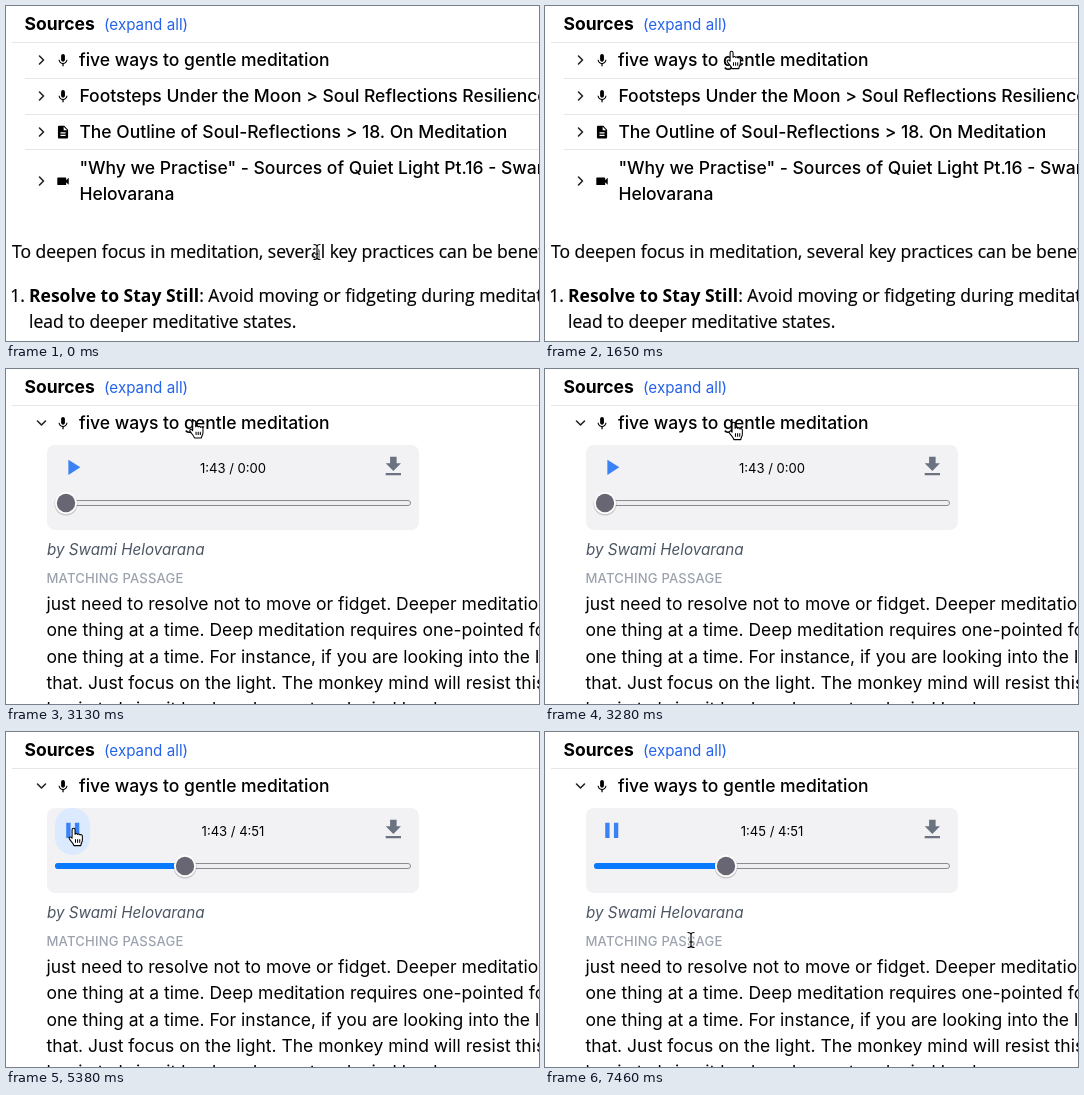
Animation, 533 px wide and 335 px high, one loop 8000 ms. Source, as an HTML page:

```html
<!DOCTYPE html>
<html lang="en">
<head>
<meta charset="utf-8">
<title>Sources</title>
<style>
  html, body { margin: 0; width: 100%; height: 100%; overflow: hidden; background: #fff; }
  svg { display: block; width: 533px; height: 335px; }
  text { font-family: Inter, sans-serif; font-size: 17.5px; white-space: pre; }
  .title { font-weight: 500; }
  .small { font-size: 15.2px; }
  .tiny { font-size: 13.05px; }
  .prose text { font-family: "Open Sans", sans-serif; stroke: #000; stroke-width: .2; }
  .prose .strong { font-weight: 700; stroke: none; }
  .rule { stroke: #e5e7eb; }
  .chevron { fill: none; stroke: #222; stroke-width: 1.6; stroke-linecap: round; stroke-linejoin: round; }
  .cursor { fill: #fff; stroke: #000; stroke-linejoin: round; }
</style>
</head>
<body>
<svg viewBox="0 0 533 335">
  <defs>
    <path id="chevron" class="chevron" d="M-2-4 2 0-2 4"/>
    <path id="mic" d="M12 14c1.66 0 3-1.34 3-3V5c0-1.66-1.34-3-3-3S9 3.34 9 5v6c0 1.66 1.34 3 3 3zm5.3-3c0 3-2.54 5.1-5.3 5.1S6.7 14 6.7 11H5c0 3.41 2.72 6.23 6 6.72V21h2v-3.28c3.28-.48 6-3.3 6-6.72z"/>
  </defs>

  <text x="18.5" y="24.2" font-weight="700">Sources</text>
  <text x="98" y="24" class="small" fill="#2563eb">(expand all)</text>
  <path class="rule" d="M6 36.5H533"/>

  <use id="toggle" href="#chevron"/>
  <use href="#mic" transform="translate(49.4 46.8) scale(.635)"/>
  <text class="title" x="73" y="60.2">five ways to gentle meditation</text>

  <g id="collapsed">
    <path class="rule" d="M19 72.5H533M19 108.5H533M19 143.5H533"/>
    <use href="#chevron" x="35.5" y="90"/>
    <use href="#chevron" x="35.5" y="126"/>
    <use href="#chevron" x="35.5" y="175"/>
    <use href="#mic" transform="translate(49.4 82.8) scale(.635)"/>
    <path transform="translate(49.4 118.6) scale(.635)" d="M14 2H6c-1.1 0-2 .9-2 2v16c0 1.1.9 2 2 2h12c1.1 0 2-.9 2-2V8zm2 16H8v-2h8zm0-4H8v-2h8zm-3-5V3.5L18.5 9z"/>
    <path transform="translate(49.4 167.6) scale(.635)" d="M17 10.5V7c0-.55-.45-1-1-1H4c-.55 0-1 .45-1 1v10c0 .55.45 1 1 1h12c.55 0 1-.45 1-1v-3.5l4 4v-11z"/>
    <g class="title">
      <text x="73.4" y="96.2">Footsteps Under the Moon &gt; Soul Reflections Resilience Talks</text>
      <text x="73.4" y="132.2">The Outline of Soul-Reflections &gt; 18. On Meditation</text>
      <text x="73.4" y="168.2">"Why we Practise" - Sources of Quiet Light Pt.16 - Swami</text>
      <text x="73.4" y="194.2">Helovarana</text>
    </g>
    <g class="prose">
      <text x="6" y="251.5">To deepen focus in meditation, several key practices can be beneficial:</text>
      <text x="4.2" y="295.5">1.</text>
      <text x="23" y="295.5"><tspan class="strong">Resolve to Stay Still</tspan>: Avoid moving or fidgeting during meditation, as it</text>
      <text x="23" y="321.6">lead to deeper meditative states.</text>
    </g>
  </g>

  <g id="expanded">
    <rect id="panel" x="41" y="76" width="372" rx="8" fill="#f2f2f5"/>
    <g id="loading">
      <path id="spinner" d="M-6.4 6.4A9 9 0 0 0 6.4 6.4" fill="none" stroke="#3b82f6" stroke-width="1.9"/>
      <text class="small" x="75.5" y="92.4" fill="#3b82f6">Loading audio...</text>
    </g>
    <g id="content">
      <rect id="hover" x="49" y="76" width="35" height="47" rx="17.5" fill="#dbeafe"/>
      <path id="button" fill="#3b82f6" transform="translate(53.7 85.3) scale(1.0875)"/>
      <text id="clock" class="tiny" x="227" y="103.8" text-anchor="middle"></text>
      <path id="download" fill="#6b7280" transform="translate(374.3 84.5) scale(1.0875)" d="M19 9h-4V3H9v6H5l7 7zM5 18v2h14v-2z"/>
      <rect id="track" x="49.5" y="131.5" width="355" height="5" rx="2.5" fill="#efeff1" stroke="#8b8b91"/>
      <rect id="played" x="49" y="131" height="6" rx="3" fill="#077aff"/>
      <g id="thumb">
        <circle cy="1" r="11.6" fill="#000" opacity=".16"/>
        <circle r="11" fill="#fff"/>
        <circle id="knob" r="9.2"/>
      </g>
      <text class="small" x="41" y="186.4" font-style="italic" fill="#4b5563">by Swami Helovarana</text>
      <text class="tiny title" x="40.5" y="214.2" fill="#9ca3af" letter-spacing=".2">MATCHING PASSAGE</text>
      <g id="passage"></g>
    </g>
  </g>

  <g id="cursor">
    <path id="hand" class="cursor" transform="translate(.8 .6) scale(1.06)" d="M-3.5 1.5V-6.5a1.4 1.4 0 0 1 2.8 0V-2.2c.3-1 2.2-.9 2.4.2.4-.8 2-.7 2.3.5.5-.7 2.2-.4 2.2.9V3.2C6.2 5.4 5 6 4.7 8.5H-1.8C-2.2 6.4-4.5 4.6-6 2.2-7 .6-5.2-.5-3.5 1.5ZM-.3 2.5v3.2M1.7 2.5v3.2M3.7 2.5v3.2"/>
    <path id="arrow" class="cursor" style="fill:#000;stroke:#fff" d="M-4-8V6L-1 3.2 1.1 8 3.5 7 1.4 2.3H5.5Z"/>
    <g id="beam" fill="none">
      <path id="beamEdge" stroke="#fff" stroke-width="3"/>
      <path id="beamLine" stroke="#000" stroke-width="1.2"/>
    </g>
  </g>
</svg>

<script>
const LOOP = 8000, TICK = 149.1;
const el = id => document.getElementById(id);
const set = (id, attrs) => Object.entries(attrs).forEach(([name, value]) => el(id).setAttribute(name, value));
const show = (id, visible) => set(id, { display: visible ? 'inline' : 'none' });

const icons = {
  hourglass: 'M6 2v6l4 4-4 4v6h12v-6l-4-4 4-4V2zm10 14.5V20H8v-3.5l4-4zm-4-5l-4-4V4h8v3.5z',
  play: 'M8 5v14l11-7z',
  pause: 'M6 19h4V5H6zm8-14v14h4V5z',
};
const beam = 'M-3.5-7.5Q0-7.5 0-5.5Q0-7.5 3.5-7.5M0-5.5V5.5M-3.5 7.5Q0 7.5 0 5.5Q0 7.5 3.5 7.5M-2 2H2';
set('beamEdge', { d: beam });
set('beamLine', { d: beam });

[
  'just need to resolve not to move or fidget. Deeper meditation',
  'one thing at a time. Deep meditation requires one-pointed focus',
  'one thing at a time. For instance, if you are looking into the light',
  'that. Just focus on the light. The monkey mind will resist this',
  'begin to bring it back and repeat and mind by degrees',
].forEach((line, i) => {
  const text = document.createElementNS('http://www.w3.org/2000/svg', 'text');
  text.setAttribute('x', 40.5);
  text.setAttribute('y', 241.3 + i * 26.1);
  text.textContent = line;
  el('passage').append(text);
});

// Pointer stops: tick, x, y
const stops = [
  [0, 311, 246], [2, 311, 246], [7, 189, 54], [9, 189, 54], [11, 188, 53], [15, 188, 53],
  [22, 190, 61], [28, 69, 104], [41, 69, 104], [43, 83, 118], [45, 146, 208],
];

function pointerAt(tick) {
  const next = stops.findIndex(stop => stop[0] > tick);
  if (next < 0) return stops[stops.length - 1].slice(1);
  const [t0, x0, y0] = stops[next - 1], [t1, x1, y1] = stops[next];
  const u = (tick - t0) / (t1 - t0), ease = u * u * (3 - 2 * u);
  return [x0 + (x1 - x0) * ease, y0 + (y1 - y0) * ease];
}

function render(ms) {
  const tick = Math.floor(ms / TICK);
  const open = tick >= 15, loading = open && tick < 20;
  const known = tick >= 25, playing = tick >= 35;
  const [x, y] = pointerAt(tick);

  show('collapsed', !open);
  show('expanded', open);
  show('loading', loading);
  set('toggle', { transform: `translate(35.5 54) rotate(${tick > 15 ? 90 : open ? 68 : 0})` });
  set('panel', { height: loading ? 111 : 85 });
  set('content', { transform: `translate(0 ${loading ? 26.3 : 0})` });
  set('spinner', { transform: `translate(57.5 86) rotate(${8 + (tick - 15) * TICK * 0.36})` });

  const overButton = known && x < 85 && y < 123;
  show('hover', overButton);
  set('button', {
    d: icons[loading ? 'hourglass' : playing ? 'pause' : 'play'],
    opacity: loading ? 0.5 : 1,
  });
  set('download', { opacity: loading ? 0.5 : 1 });
  set('track', { opacity: loading ? 0.6 : 1 });
  set('knob', { fill: loading ? '#918fa0' : '#686672' });

  const second = tick >= 47 ? 5 : tick >= 40 ? 4 : 3;
  el('clock').textContent = `1:4${second} / ${known ? '4:51' : '0:00'}`;
  const thumbX = !known ? 60 : 178 + [36, 42, 50].filter(step => tick >= step).length;
  show('played', known);
  set('played', { width: thumbX - 49 });
  set('thumb', { transform: `translate(${thumbX} 134)` });

  const overRow = open ? y < 68 : y < 205;
  const overText = open ? y > 200 : y > 232;
  const shape = overRow || overButton ? 'hand' : overText ? 'beam' : 'arrow';
  ['hand', 'arrow', 'beam'].forEach(id => show(id, id === shape));
  set('cursor', { transform: `translate(${x} ${y})` });
}

const start = performance.now();
function loop() {
  render((performance.now() - start) % LOOP);
  requestAnimationFrame(loop);
}
loop();
</script>
</body>
</html>
```
